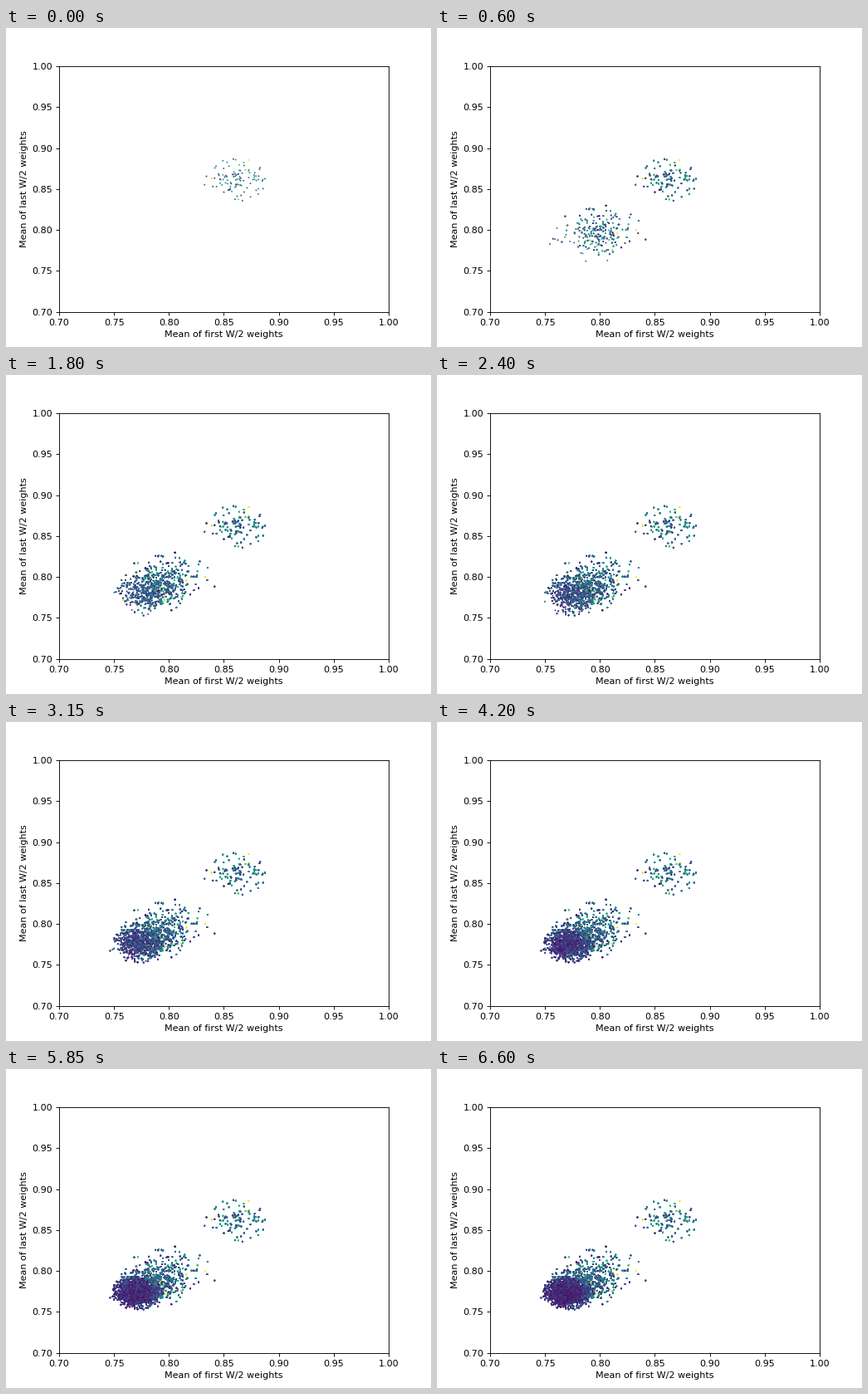
Recreate the animation shown at these times as a matplotlib script. Size 512 px wide and 384 px high, loop 6.75 s.

```python
import numpy as np
import matplotlib.pyplot as plt
from matplotlib.animation import FuncAnimation

FRAMES, INTERVAL = 45, 150
FOUNDERS, BROOD = 100, 54
PASSES = 8

rng = np.random.default_rng(12)


def cloud(n, center, spread, reach=2.7):
    """Normal scatter cut off at `reach` standard deviations."""
    u = rng.random(n) * (1 - np.exp(-reach ** 2 / 2))
    r, a = np.sqrt(-2 * np.log(1 - u)), rng.uniform(0, 2 * np.pi, n)
    return np.array(center) + np.c_[r * np.cos(a), r * np.sin(a)] * spread


def brood(gen):
    """Each generation drifts down and left while it narrows."""
    if gen == 0:
        return cloud(FOUNDERS, (.860, .861), (.0125, .0115))
    center = (.769 + .034 * np.exp(-(gen - 1) / 7),
              .773 + .030 * np.exp(-(gen - 1) / 6))
    width = .007 + .0095 * np.exp(-gen / 16)
    return cloud(BROOD, center, (width, width * .87))


def levels(gen, n):
    mean = .08 + .30 * np.exp(-max(gen - 5, 0) / 14)
    return np.clip(rng.gamma(4, mean / 4, n), 0, 1)


broods = [brood(gen) for gen in range(FRAMES)]
level = np.concatenate([levels(g, len(b)) for g, b in enumerate(broods)])
born = np.repeat(np.arange(FRAMES), [len(b) for b in broods])
xy = np.concatenate(broods)

fig, ax = plt.subplots(figsize=(6.4, 4.8), dpi=80)
ax.set(xlim=(.7, 1), ylim=(.7, 1),
       xlabel="Mean of first W/2 weights", ylabel="Mean of last W/2 weights")

# Stacked layers: dots firm up as they are painted over again
layers = [ax.scatter([], [], s=3, c=[], cmap="viridis", vmin=0, vmax=1,
                     linewidths=0) for _ in range(PASSES)]


def update(frame):
    for delay, layer in zip(reversed(range(PASSES)), layers):
        shown = born + delay <= frame
        layer.set_offsets(xy[shown])
        layer.set_array(level[shown])
    return layers


anim = FuncAnimation(fig, update, frames=FRAMES, interval=INTERVAL,
                     init_func=lambda: update(0), repeat=True, repeat_delay=0)
plt.show()
```
